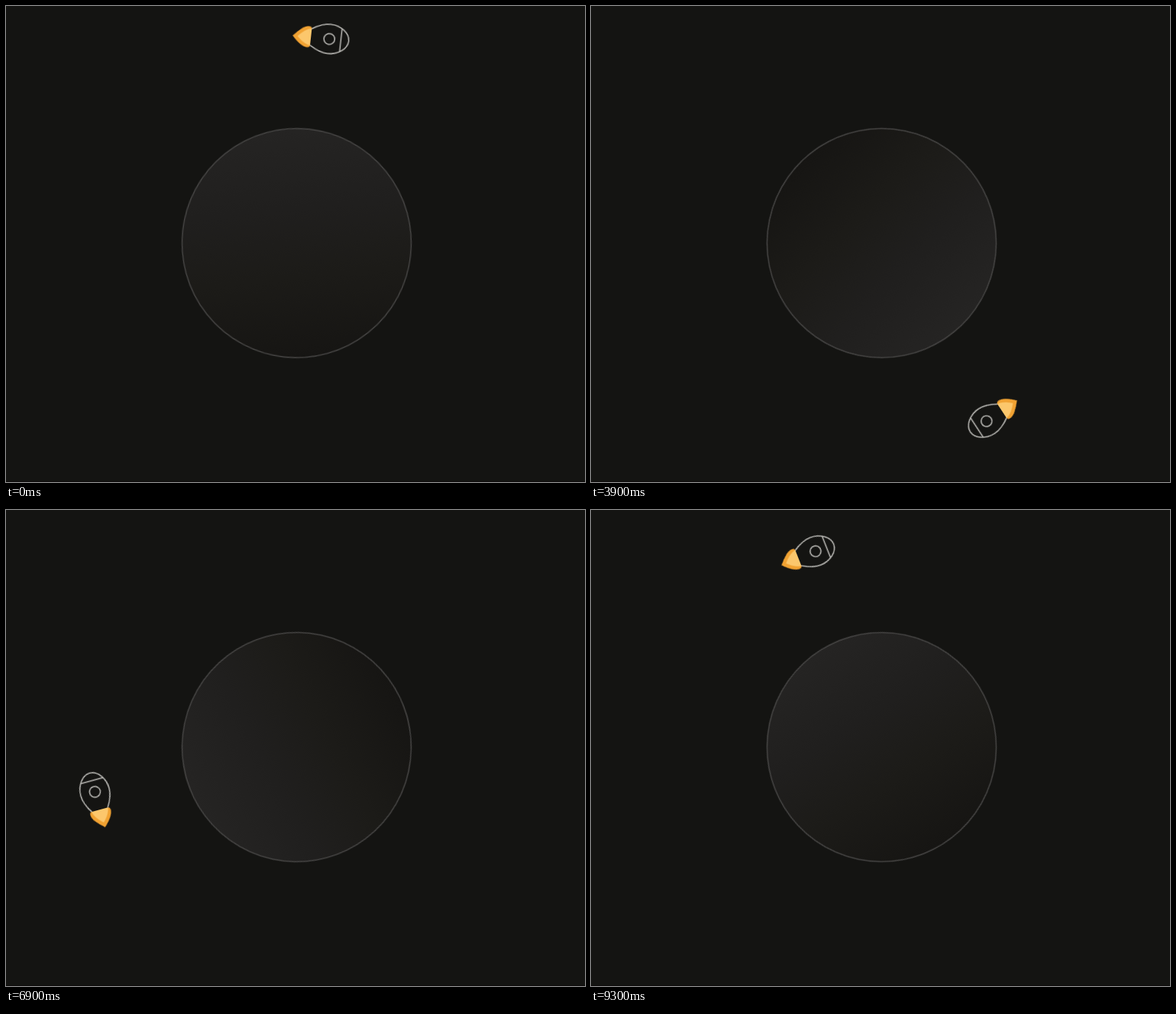
These frames come from a looping animation (758x623 px, 9.4 s). An HTML page:

```html
<!DOCTYPE html>
<html lang="en">
<head>
<meta charset="utf-8">
<title>Rocket in orbit</title>
<style>
  html, body { margin: 0; width: 100%; height: 100%; overflow: hidden; background: #141412; }
  svg { display: block; width: 758px; height: 623px; }
  .line { fill: none; stroke: #bcbbb7; stroke-width: 1.5; }
</style>
</head>
<body>
<svg viewBox="0 0 758 623">
  <defs>
    <linearGradient id="shade" gradientUnits="userSpaceOnUse" x1="0" y1="-150" x2="0" y2="150" gradientTransform="rotate(-12)">
      <stop offset="0" stop-color="#252423"/>
      <stop offset=".35" stop-color="#201f1e"/>
      <stop offset=".65" stop-color="#1c1b18"/>
      <stop offset="1" stop-color="#161513"/>
    </linearGradient>
  </defs>
  <rect y="622" width="758" height="1" fill="#0d0b0b"/>
  <g transform="translate(380.5 310.3)">
    <g id="orbit">
      <circle r="150" fill="url(#shade)" stroke="#484746" stroke-width="1.4"/>
      <g transform="translate(0 -270.2)">
        <path class="line" d="M-11-10.8C-4-15.2 4-19.2 13-19.2C27-19.2 38.7-10 38.7 0S27 19.2 13 19.2C4 19.2-4 15.2-11 10.8"/>
        <path class="line" d="M28.4-15.2V15.2"/>
        <circle class="line" cx="13.2" r="7.1"/>
        <path fill="#f1a232" d="M-35 .6C-27-8-21-13.9-14.5-13.9Q-11.5-13.9-11-11.5V11.5Q-11.5 13.9-14.5 13.9C-21 13.9-28 8-35 .6Z"/>
        <path fill="#fcc76c" d="M-28.5 .6C-23-5-18-10-11-11V11C-18 10-23 6-28.5 .6Z"/>
      </g>
    </g>
  </g>
</svg>
<script>
  const STEP = 100, STEPS = 94, LATE = 90;
  const START = 6.3, TURN = 3.6, LATE_TURN = 2.75;  // degrees, degrees per step

  const lateStart = START + TURN * LATE;
  const end = lateStart + LATE_TURN * (STEPS - LATE);
  const rotate = angle => `rotate(${angle}deg)`;

  // An even turn in hard steps that slows slightly before the loop restarts
  document.getElementById('orbit').animate([
    { offset: 0, transform: rotate(START), easing: `steps(${LATE})` },
    { offset: LATE / STEPS, transform: rotate(lateStart), easing: `steps(${STEPS - LATE})` },
    { offset: 1, transform: rotate(end) }
  ], { duration: STEP * STEPS, iterations: Infinity });
</script>
</body>
</html>
```
